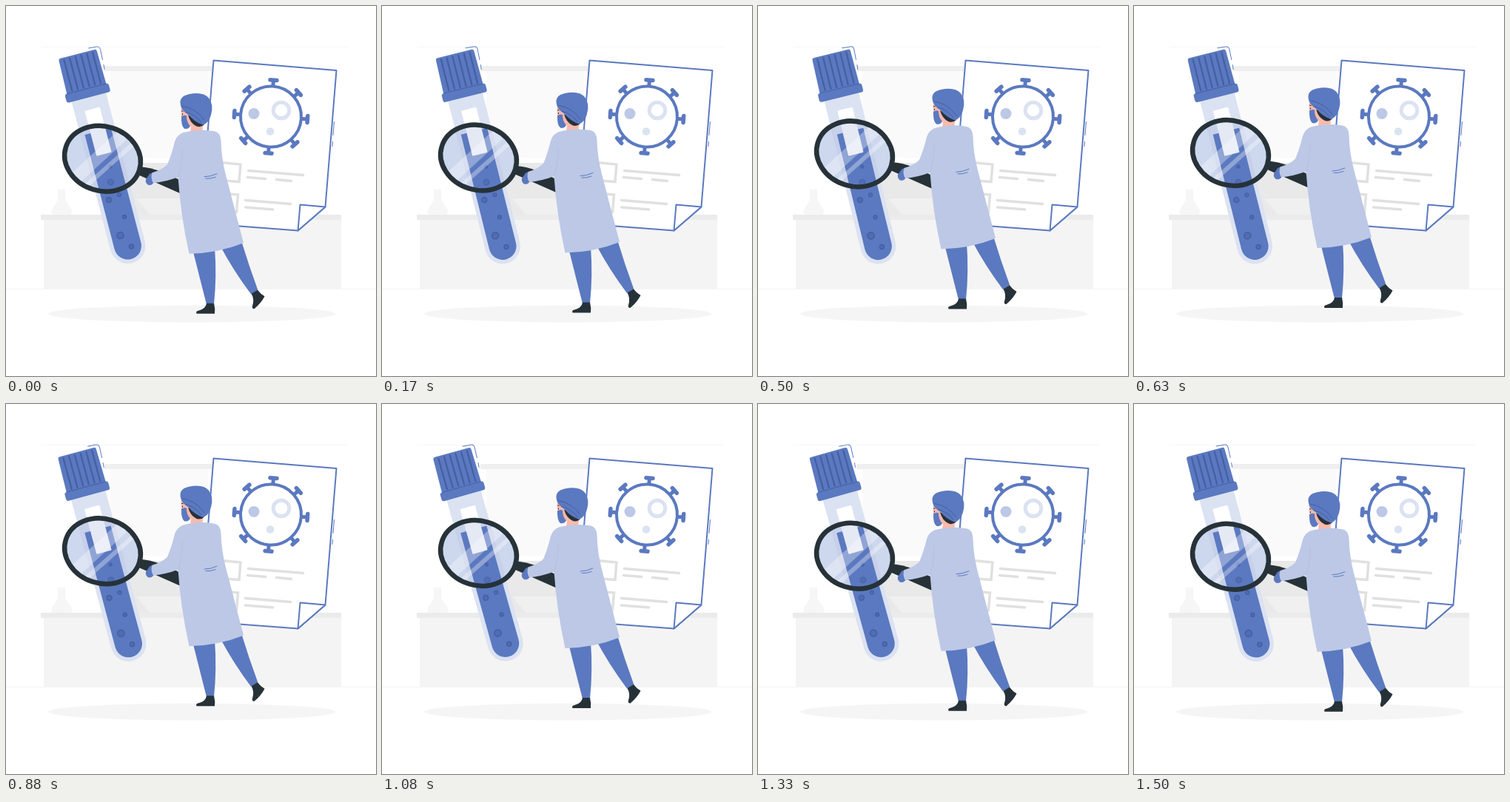
An HTML page that plays this animation: 500 px wide and 500 px high, repeating every 1.54 s.

```html
<!DOCTYPE html>
<html lang="en">
<head>
<meta charset="utf-8">
<title>Lab researcher</title>
<style>
  html, body { margin: 0; height: 100%; overflow: hidden; background: #fff; }
  svg { display: block; width: 100vw; height: 100vh; }
  .blue { fill: #5b79c0; }
  .dark { fill: #263238; }
  .line { fill: none; stroke: #5b79c0; stroke-linecap: round; stroke-linejoin: round; }
  .deep { fill: none; stroke: #4560a3; stroke-linecap: round; }
  .grey { fill: none; stroke: #e0e0e0; stroke-width: 3.5; stroke-linecap: round; }
</style>
</head>
<body>
<svg viewBox="0 0 500 500">
  <defs>
    <ellipse id="lens" cx="130.500" cy="206" rx="52" ry="43.600" transform="rotate(17 130.5 206)"/>
    <clipPath id="glass"><use href="#lens"/></clipPath>
    <g id="spike" class="line"><path d="M0-42V-48" stroke-width="5"/><path d="M-4.500-49.500H4.500" stroke-width="5.500"/></g>
  </defs>

  <!-- room -->
  <path d="M48 55.500H462" stroke="#f8f8f8"/>
  <path d="M0 382.500H500" stroke="#f5f5f5"/>
  <path d="M141 88H273V205H141z" fill="#fafafa"/>
  <path d="M133 81H281V88H133z" fill="#efefef"/>
  <path d="M51 289H453V382H51z" fill="#f4f4f4"/>
  <path d="M47 282H453V289H47z" fill="#ebebeb"/>
  <path d="M70 248H80V262L89 276Q90 282 86 282H64Q60 282 62 276L70 262z" fill="#f6f6f6"/>
  <path d="M158 260H240V282H158z" fill="#f0f0f0"/>
  <path d="M158 212H240V260H176L194 282H158z" fill="#e9e9e9"/>
  <ellipse cx="251" cy="416" rx="194" ry="11.500" fill="#f5f5f5"/>

  <!-- report -->
  <g transform="translate(.5 .5)">
    <path class="line" style="fill:#fff" stroke-width="2" d="M280 73L446 86.500L431 271L394 303L262 293z"/>
    <path class="line" style="fill:#fff" stroke-width="2" d="M397 268L431 271L394 303z"/>
    <path class="line" d="M443 156L441.500 174M441 183L440.500 189"/>
    <path class="grey" d="M290 211L316.500 213.500L314.500 237L288 235zM287 252L313 254.500L311 278L285 276z"/>
    <path class="grey" d="M327 222L401 228M326 231L350 233M365 234L385 236M323 262L384 267M323 271.500L360 274.500"/>
    <g transform="translate(357.500 149) rotate(4)">
      <circle class="line" r="41" stroke-width="4"/>
      <g id="spikes"></g>
    </g>
    <circle cx="334.500" cy="145" r="7.500" fill="#bcc8e6"/>
    <circle cx="371.500" cy="140.500" r="10.800" fill="none" stroke="#dbe2f2" stroke-width="5"/>
    <circle cx="356.500" cy="169" r="5.300" fill="#dbe2f2"/>
  </g>

  <!-- tint behind the tube, follows the lens -->
  <g class="bob"><use href="#lens" fill="#e4eaf7"/></g>

  <g id="tube">
    <path d="M-24-74H24V134A24 24 0 0 1-24 134z" fill="#dbe2f2"/>
    <path class="blue" d="M-18-26H18.500V134A18.500 18.500 0 0 1-18.500 134z"/>
    <rect x="-10" y="-57" width="21" height="63" rx="1" fill="#fff"/>
    <path class="blue" d="M-26.500-131Q-26.500-134-23.500-134H23.500Q26.500-134 26.500-131L27.500-83H-27.500z"/>
    <rect class="blue" x="-30.500" y="-85.500" width="61" height="12" rx="3"/>
    <path class="deep" d="M-27-85.500H27" stroke-width="1"/>
    <path class="deep" d="M-19.500-131V-88M-11.500-131V-88M-3.500-131V-88M4.500-131V-88M12.500-131V-88M20.500-131V-88" stroke-width="2.300"/>
    <g transform="rotate(14.700)">
      <path class="line" d="M-19-137.500L-8-139.500Q-4-140-3-136L0-122M1.500-115L2.500-109"/>
      <g class="deep" style="fill:#506db3" stroke-width="1.700">
        <circle cx="10.500" cy="22.500" r="1.800"/>
        <circle cx="11" cy="43.500" r="3.800" stroke-width="1.200"/>
        <circle cx="8.500" cy="67.500" r="3.400"/>
        <circle cx="22.500" cy="60.500" r="2.500" stroke-width="1.200"/>
        <circle cx="29.500" cy="90.500" r="2.300"/>
        <circle cx="24" cy="115.500" r="4.500"/>
        <circle cx="39" cy="130.500" r="2.900"/>
      </g>
    </g>
  </g>

  <g class="bob">
    <!-- magnifier -->
    <use href="#lens" fill="#5b79c0" opacity=".16"/>
    <g clip-path="url(#glass)" stroke="#fff" stroke-opacity=".32">
      <path d="M92 234L162 170" stroke-width="17"/>
      <path d="M108 243L180 179" stroke-width="6"/>
    </g>
    <path class="dark" d="M181 217Q208 219 240 238V255L179 228z"/>
    <use href="#lens" fill="none" stroke="#263238" stroke-width="6.500"/>

    <!-- legs and shoes -->
    <path class="blue" d="M252 328L282 326Q285 365 281 403H271Q262 368 252 328zM289 323L318 317Q328 350 340.500 384L331 389Q307 357 289 323z"/>
    <path class="dark" d="M271 401.500H281Q283 409 282 415.500H257.500Q256 412 260 411.500Q270 409 271 401.500zM331.500 388.500L340 383.500Q344 389 349.500 392Q345 401 335.500 409Q332 409 333 405Q336 396 331.500 388.500z"/>

    <!-- head -->
    <path d="M237 136Q235.500 152 240 160L250 162L249 171Q258 174 265 170L267 156z" fill="#f9b9ad"/>
    <path class="dark" d="M246 147Q249 158 257 162Q263 164.500 268 160z"/>
    <path class="blue" d="M237 149Q241 146.500 244 148Q244 157 249 162Q246 167 241 165.500Q236.500 162 237 149z"/>
    <path d="M237 141.500L239.500 142M238.500 145V147" stroke="#263238"/>
    <path class="blue" d="M236 134Q233 122 247 119Q266 115 274 124Q281 133 277 147Q274 158 266 160.500Q254 156 247 147Q237 141 236 134z"/>
    <path class="deep" d="M238 135Q257 138 268 154M243 143Q257 147 264 157" stroke-width="1"/>

    <!-- coat and glove -->
    <path class="blue" d="M200 225Q194 225 192.500 229L189 234Q188 239 192 241.500Q198 243 200 237z"/>
    <path d="M239 171Q262 165 282 169Q290 171 290.500 182Q291 205 297 228L321 320Q286 334 247.500 334.500Q236 283 232.500 231Q217 237 199 239Q195 232 197.500 225Q211 221 218 214Q224 200 228 183Q231 174 239 171z" fill="#bcc8e6"/>
    <path d="M238 192Q238 216 232.500 231" fill="none" stroke="#b3c0e1"/>
    <path class="line" d="M268 230.500Q276 230.500 285 226.500M270 233Q277 233.500 283 231"/>
  </g>
</svg>
<script>
  const LOOP = 1540, STEPS = 37, TURN = 2 * Math.PI;
  const tube = document.getElementById('tube');
  const bobbing = document.querySelectorAll('.bob');

  document.getElementById('spikes').innerHTML = Array.from({ length: 8 },
    (_, i) => `<use href="#spike" transform="rotate(${i * 45})"/>`).join('');

  function draw(now) {
    const step = Math.floor(now % LOOP / LOOP * STEPS + 0.1) % STEPS;
    const phase = TURN * step / STEPS;
    const lift = 4.1 * Math.cos(phase + 0.13) - 3.8;
    const tilt = -14.7 + 1.05 * Math.sin(phase);
    bobbing.forEach(el => el.setAttribute('transform', `translate(0 ${lift})`));
    tube.setAttribute('transform', `translate(130.5 194.5) rotate(${tilt})`);
  }

  const start = performance.now();
  function tick() {
    draw(performance.now() - start);
    requestAnimationFrame(tick);
  }
  tick();
</script>
</body>
</html>
```
